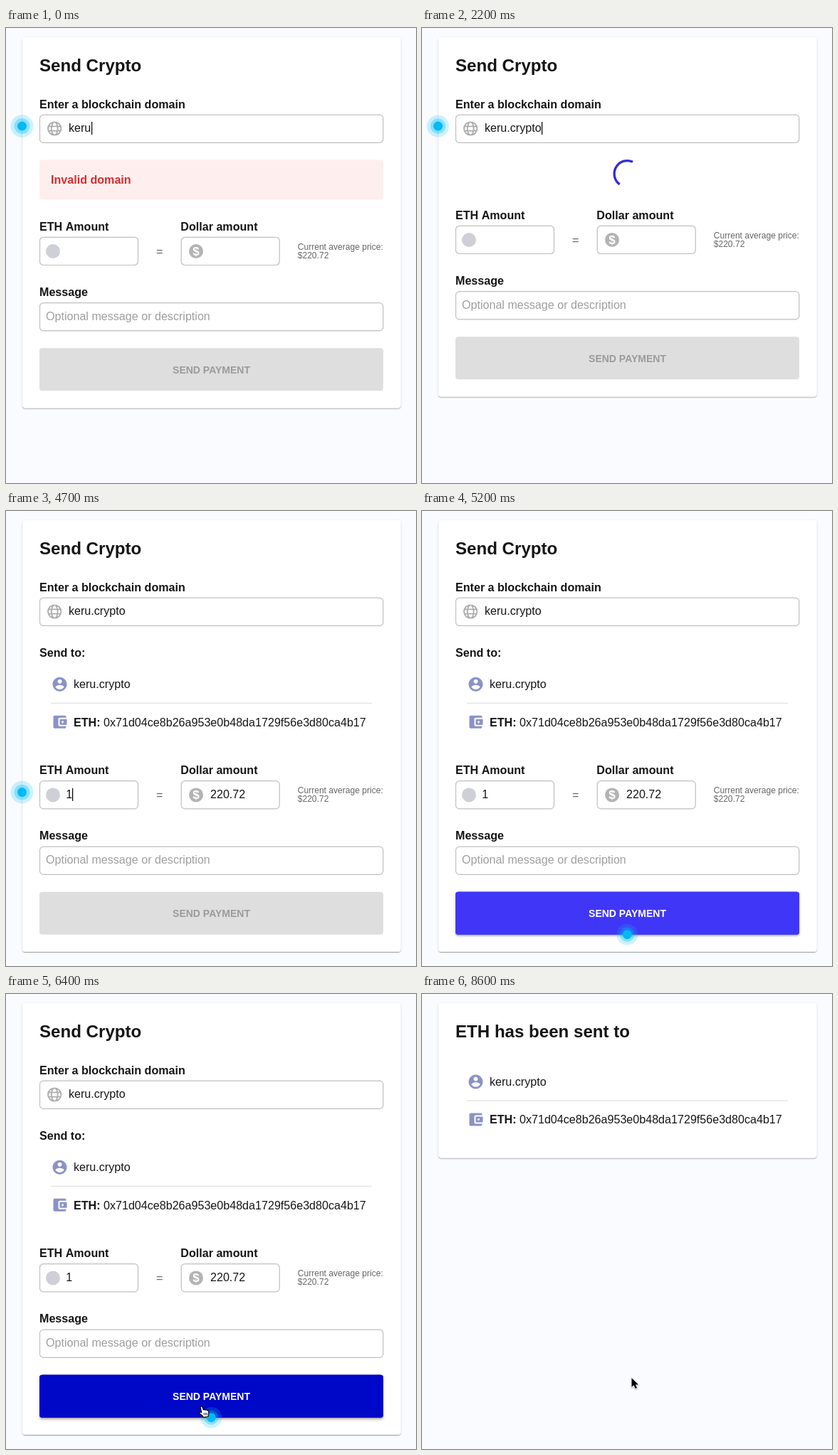
An HTML page with a canvas that plays this animation: 576x640 px, repeating every 9000 ms.

```html
<!DOCTYPE html>
<html lang="en">
<head>
<meta charset="utf-8">
<title>Send Crypto</title>
<style>
html, body { margin: 0; width: 100%; height: 100%; overflow: hidden; background: #fafbff; }
canvas { display: block; }
</style>
</head>
<body>
<canvas id="stage" width="576" height="640"></canvas>
<script>
const ctx = document.getElementById('stage').getContext('2d');
const LOOP = 9000;
const NAME = 'keru';
const SUFFIX = '.crypto';
const ADDRESS = '0x71d04ce8b26a953e0b48da1729f56e3d80ca4b17';
const INK = '#151515';
const PURPLE = '#8b92c6';

// Moments of the story, in ms
const TYPE = 1000, KEY = 125, SPIN = 1808, FOUND = 2600;
const FOCUS = 4000, AMOUNT = 4700, READY = 4800, HOVER = 5860, SENT = 6800;

const PERSON = new Path2D('M12 2C6.48 2 2 6.48 2 12s4.48 10 10 10 10-4.48 10-10S17.52 2 12 2zm0 3c1.66 0 3 1.34 3 3s-1.34 3-3 3-3-1.34-3-3 1.34-3 3-3zm0 14.2c-2.5 0-4.71-1.28-6-3.22.03-1.99 4-3.08 6-3.08 1.99 0 5.97 1.09 6 3.08-1.29 1.94-3.5 3.22-6 3.22z');
const WALLET = new Path2D('M21 18v1c0 1.1-.9 2-2 2H5c-1.11 0-2-.9-2-2V5c0-1.1.89-2 2-2h14c1.1 0 2 .9 2 2v1h-9c-1.11 0-2 .9-2 2v8c0 1.1.89 2 2 2h9zm-9-2h10V8H12v8zm4-2.5c-.83 0-1.5-.67-1.5-1.5s.67-1.5 1.5-1.5 1.5.67 1.5 1.5-.67 1.5-1.5 1.5z');
const ARROW = new Path2D('M0 0V13L3 10.2L5.2 15L7.6 14L5.5 9.4H9.6Z');
const HAND = new Path2D('M-2 1.2C-1.5-.6.5-.4 1 1.2L2.4 5C3.4 4 4.6 4.2 5 5.2C6 4.4 7.2 4.8 7.4 5.8C8.6 5.3 9.4 6 9.6 7.2C10.2 10.5 9.4 11.8 9 14.5L2.4 15.4C1 12.5-1.5 11.2-3.6 9.6C-4.4 8.4-2.6 7.4-.2 8.8Z');

// Pointer stops: time, x, y
const APPROACH = [[3250, 300, 640], [3600, 183, 428], [3850, 140, 399], [AMOUNT, 140, 399]];
const PRESS = [[5600, 140, 402], [6100, 259.5, 603.5], [6350, 275, 580], [6600, 275, 580],
  [SENT, 277, 572], [8000, 277, 572], [8550, 294.5, 540], [LOOP, 294.5, 540]];

const clamp = v => Math.min(1, Math.max(0, v));
const ease = v => { v = clamp(v); return v * v * (3 - 2 * v); };
const mix = (a, b, k) => a + (b - a) * k;
const blend = (a, b, k) => `rgb(${a.map((v, i) => Math.round(mix(v, b[i], k)))})`;

function text(s, x, y, { size = 16.1, bold = false, color = INK, align = 'left' } = {}) {
  ctx.font = `${bold ? 'bold ' : ''}${size}px "Liberation Sans", Helvetica, Arial, sans-serif`;
  ctx.fillStyle = color;
  ctx.textAlign = align;
  ctx.fillText(s, x, y);
  return ctx.measureText(s).width;
}

const label = (s, x, y) => text(s, x, y, { bold: true });
const title = s => text(s, 47, 61, { size: 24.1, bold: true });

function box(x, y, w, h, r, fill, stroke) {
  ctx.beginPath();
  ctx.roundRect(x, y, w, h, r);
  if (fill) { ctx.fillStyle = fill; ctx.fill(); }
  if (stroke) { ctx.strokeStyle = stroke; ctx.lineWidth = 1.2; ctx.stroke(); }
}

function disc(x, y, r, color) {
  ctx.beginPath();
  ctx.arc(x, y, r, 0, 2 * Math.PI);
  ctx.fillStyle = color;
  ctx.fill();
}

function shadowBox(x, y, w, h, fill, layers) {
  for (const [dy, blur, alpha] of layers) {
    ctx.save();
    ctx.shadowColor = `rgba(0,0,0,${alpha})`;
    ctx.shadowOffsetY = dy;
    ctx.shadowBlur = blur;
    box(x, y, w, h, 4, fill);
    ctx.restore();
  }
  box(x, y, w, h, 4, fill);
}

const card = bottom =>
  shadowBox(23, 13, 531.5, bottom - 13, '#fff', [[1, 1, .3], [1, 3, .14]]);

const field = (x, y, w) => box(x, y, w, 39.2, 5, '#fff', '#bfbfbf');

function icon(path, x, y) {
  ctx.save();
  ctx.translate(x, y);
  ctx.fillStyle = PURPLE;
  ctx.fill(path);
  ctx.restore();
}

function globe(x, y) {
  ctx.save();
  ctx.translate(x, y);
  ctx.strokeStyle = '#adadad';
  ctx.lineWidth = 1.8;
  ctx.beginPath();
  ctx.arc(0, 0, 9.2, 0, 2 * Math.PI);
  ctx.moveTo(4.4, 0);
  ctx.ellipse(0, 0, 4.4, 9.2, 0, 0, 2 * Math.PI);
  for (const row of [-3.2, 3.2]) {
    ctx.moveTo(-8.6, row);
    ctx.lineTo(8.6, row);
  }
  ctx.stroke();
  ctx.restore();
}

function caret(x, y) {
  ctx.fillStyle = '#000';
  ctx.fillRect(Math.round(x), y, 1.2, 18);
}

function beacon(t, x, y) {
  const k = .95 + .05 * Math.cos(t / 1200 * 2 * Math.PI);
  disc(x, y, 16 * k, 'rgba(0,190,250,.2)');
  disc(x, y, 11 * k, 'rgba(0,190,250,.32)');
  disc(x, y, 6.5, '#00b9f5');
}

function recipient(y) {
  icon(PERSON, 63.5, y - 12);
  text(NAME + SUFFIX, 95, y + 5.5);
  ctx.fillStyle = '#e0e0e0';
  ctx.fillRect(63, y + 26, 451, 1.2);
  icon(WALLET, 63.5, y + 41);
  const w = label('ETH: ', 95, y + 58.7);
  text(ADDRESS, 95 + w, y + 58.7);
}

function spinner(t) {
  const p = (t - SPIN) / 1400 % 1;
  const grow = ease(p * 2), slide = ease(p * 2 - 1);
  const unit = 2 * Math.PI / 126.9;
  const from = mix(15 * grow, 125, slide);
  const to = Math.min(from + mix(1, 100, grow), 126.9);
  const turn = p * 2 * Math.PI;
  ctx.beginPath();
  ctx.arc(288.5, 205, 18.4, turn + from * unit, turn + to * unit);
  ctx.strokeStyle = '#342bd8';
  ctx.lineWidth = 3.3;
  ctx.stroke();
}

function button(t, y) {
  const on = ease((t - AMOUNT) / 250), hover = ease((t - HOVER) / 300);
  const blue = [mix(64, 0, hover), mix(54, 8, hover), mix(248, 200, hover)];
  const color = blend([222, 222, 222], blue, on);
  const layers = on ? [[2, 2, .24 * on], [mix(1, 3, hover), 5, .16 * on]] : [];
  shadowBox(47, y, 483, 60, color, layers);
  text('SEND PAYMENT', 288.5, y + 35.3,
    { size: 14, bold: true, align: 'center', color: blend([155, 155, 155], [255, 255, 255], on) });
}

function domainCaret(t) {
  if (t < TYPE) return t < 100 || t >= 600;
  if (t >= FOCUS) return false;
  const last = TYPE + KEY * (SUFFIX.length - 1);
  return t < last || (t - last) % 1000 < 500;
}

function form(t) {
  const found = t >= FOUND, busy = t >= SPIN && !found;
  const dy = found ? 85.4 : busy ? -16 : 0;
  card(534.5 + dy);
  title('Send Crypto');

  label('Enter a blockchain domain', 47, 112.5);
  field(47.5, 122.2, 482.3);
  globe(68.2, 141.5);
  const typed = t < TYPE ? 0 : Math.floor((t - TYPE) / KEY) + 1;
  const end = 88 + text(NAME + SUFFIX.slice(0, typed), 88, 146);
  if (domainCaret(t)) caret(end + .3, 132);

  if (found) {
    label('Send to:', 47, 204.7);
    recipient(243.8);
  } else if (busy) {
    spinner(t);
  } else {
    box(47, 185.5, 483, 56, 4, '#ffeeee');
    text('Invalid domain', 63, 218.7, { bold: true, color: '#d13030' });
  }

  label('ETH Amount', 47, 285 + dy);
  label('Dollar amount', 245.3, 285 + dy);
  field(47.5, 294.3 + dy, 138);
  field(246.2, 294.3 + dy, 138);
  disc(66, 314 + dy, 10, '#cfcfd7');
  disc(267, 314 + dy, 10, '#b3b3b3');
  text('$', 267, 319.8 + dy, { size: 17, bold: true, color: '#fff', align: 'center' });
  text('=', 215.6, 320 + dy, { color: '#666', align: 'center' });
  const small = { size: 12.08, color: '#666' };
  text('Current average price:', 409.7, 312 + dy, small);
  text('$220.72', 409.7, 324 + dy, small);

  const filled = t >= AMOUNT;
  if (filled) {
    text('1', 84.2, 318.1 + dy);
    text('220.72', 287, 318.1 + dy);
  }
  const since = t - (filled ? AMOUNT : FOCUS);
  if (since >= 0 && since % 1000 < 500) caret(filled ? 93.3 : 84, 304.5 + dy);

  label('Message', 47, 377 + dy);
  field(47.5, 386.7 + dy, 482.3);
  text('Optional message or description', 56, 411 + dy, { color: '#9e9e9e' });
  button(t, 450.3 + dy);

  if (t >= READY) beacon(t, 288.3, 595.7);
  else beacon(t, 22.5, found ? 395.6 : 138);
}

function along(stops, t) {
  const i = stops.findIndex(s => s[0] > t);
  const [t0, x0, y0] = stops[i - 1], [t1, x1, y1] = stops[i];
  const k = ease((t - t0) / (t1 - t0));
  return [mix(x0, x1, k), mix(y0, y1, k)];
}

function pointer(t) {
  const stops = [APPROACH, PRESS].find(s => t >= s[0][0] && t < s[s.length - 1][0]);
  if (!stops) return;
  const [x, y] = along(stops, t);
  const overField = t < SENT && x < 185 && y > 380 && y < 419;
  const overButton = t < SENT && y > 536 && y < 596;
  ctx.save();
  ctx.translate(x, y);
  ctx.lineJoin = 'round';
  if (overField) {
    ctx.beginPath();
    ctx.moveTo(-2.5, -8); ctx.lineTo(2.5, -8);
    ctx.moveTo(0, -8); ctx.lineTo(0, 8);
    ctx.moveTo(-2.5, 8); ctx.lineTo(2.5, 8);
    ctx.strokeStyle = '#222';
    ctx.lineWidth = 1;
    ctx.stroke();
  } else if (overButton) {
    ctx.fillStyle = '#fff';
    ctx.strokeStyle = '#000';
    ctx.lineWidth = 1.2;
    ctx.fill(HAND);
    ctx.stroke(HAND);
    ctx.beginPath();
    for (const dx of [3, 5, 7]) {
      ctx.moveTo(dx, 9);
      ctx.lineTo(dx + .6, 12.5);
    }
    ctx.lineWidth = .8;
    ctx.stroke();
  } else {
    ctx.shadowColor = 'rgba(0,0,0,.3)';
    ctx.shadowBlur = 2;
    ctx.shadowOffsetY = 1;
    ctx.strokeStyle = '#fff';
    ctx.lineWidth = 2;
    ctx.stroke(ARROW);
    ctx.shadowColor = 'transparent';
    ctx.fillStyle = '#000';
    ctx.fill(ARROW);
  }
  ctx.restore();
}

function draw(now) {
  const t = now % LOOP;
  ctx.fillStyle = '#fafbff';
  ctx.fillRect(0, 0, 576, 640);
  if (t < SENT) {
    form(t);
  } else {
    card(230.5);
    title('ETH has been sent to');
    recipient(123.4);
  }
  pointer(t);
}

let start;
function tick(now) {
  start ??= now;
  draw(now - start);
  requestAnimationFrame(tick);
}
draw(0);
requestAnimationFrame(tick);
</script>
</body>
</html>
```
